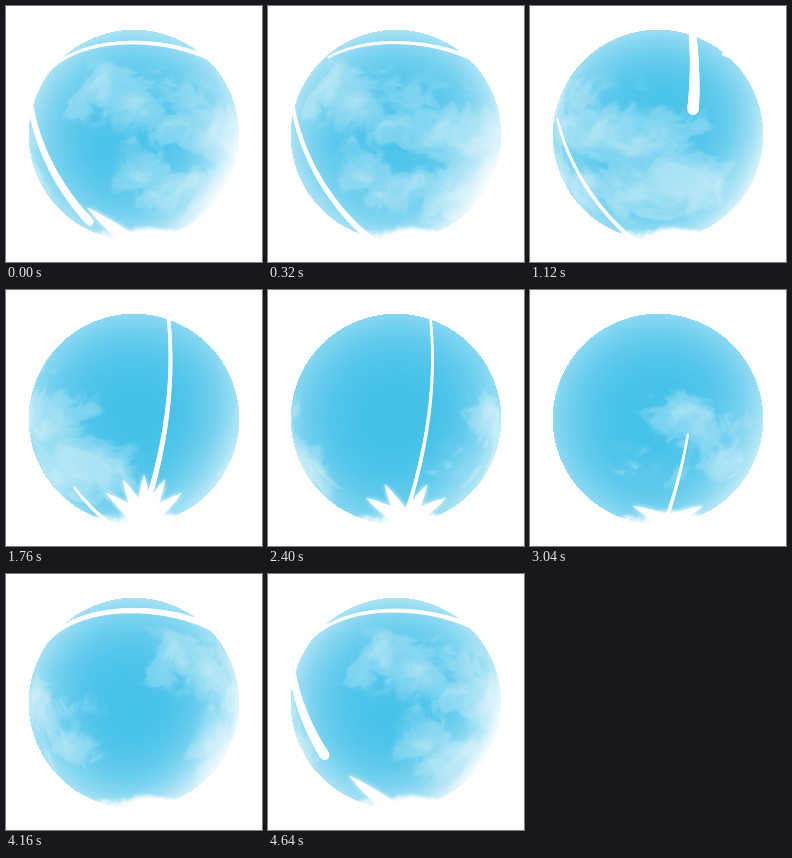
An HTML page with a canvas for the animation above (4.8 s loop, 256x256 px).

```html
<!DOCTYPE html>
<html lang="en">
<head>
<meta charset="utf-8">
<title>Cloud globe</title>
<style>
html, body { margin: 0; width: 100%; height: 100%; overflow: hidden; background: #fff; }
canvas { display: block; width: 256px; height: 256px; }
</style>
</head>
<body>
<canvas id="stage" width="256" height="256"></canvas>
<script>
const LOOP = 4800, STEP = 160, SIZE = 256;
const CX = 128, CY = 129, R = 105.3;
const COLS = 660, ROWS = 212, TAU = Math.PI * 2;
const BLUE = [60, 190, 232];
const ctx = document.getElementById('stage').getContext('2d');

const clamp = (x, a = 0, b = 1) => Math.min(b, Math.max(a, x));
const smooth = (a, b, x) => { x = clamp((x - a) / (b - a)); return x * x * (3 - 2 * x); };
const mix = (a, b, k) => a + (b - a) * k;
const since = (start, t) => (t - start + LOOP) % LOOP;

function hash(x, y, z) {
  let h = Math.imul(x, 374761393) ^ Math.imul(y, 668265263) ^ Math.imul(z, 1274126177);
  h = Math.imul(h ^ (h >>> 13), 1103515245);
  return ((h ^ (h >>> 16)) >>> 0) / 4294967296;
}

function noise(x, y, z) {
  const i = Math.floor(x), j = Math.floor(y), k = Math.floor(z);
  const u = smooth(0, 1, x - i), v = smooth(0, 1, y - j), w = smooth(0, 1, z - k);
  const edge = (b, c) => mix(hash(i, b, c), hash(i + 1, b, c), u);
  const face = c => mix(edge(j, c), edge(j + 1, c), v);
  return mix(face(k), face(k + 1), w);
}

function fbm(x, y, z, octaves) {
  let sum = 0, amp = 0.5, total = 0;
  for (let i = 0; i < octaves; i++) {
    sum += amp * noise(x, y, z);
    total += amp;
    amp *= 0.55;
    x = x * 2.03 + 7.1; y = y * 2.03 + 3.7; z = z * 2.03 + 5.3;
  }
  return sum / total;
}

// Cloud banks: longitude, height, size in degrees
const BANKS = [
  [-8, -0.34, 30], [12, 0.45, 20], [45, -0.1, 24], [72, 0.5, 28], [82, 0, 26],
  [112, 0.45, 21], [242, -0.05, 18], [262, 0.1, 21], [222, 0.5, 15], [272, 0.42, 15]
];

function density(lon, v) {
  let sum = 0;
  for (const [l, h, size] of BANKS) {
    const a = ((lon - l + 540) % 360 - 180) / size, b = (v - h) / size * 105;
    sum += 0.85 * Math.exp(-0.7 * (a * a + b * b));
  }
  return Math.min(sum, 1);
}

function makeClouds() {
  const map = new Float32Array(COLS * ROWS);
  for (let r = 0; r < ROWS; r++) {
    const v = clamp((r - ROWS / 2 + 0.5) / R, -1, 1), ring = Math.sqrt(1 - v * v);
    for (let c = 0; c < COLS; c++) {
      const a = c / COLS * TAU;
      const m = density(a / TAU * 360, v);
      if (m < 0.03) continue;
      const x = Math.cos(a) * ring * 3 + 20, y = v * 3.6 + 20, z = Math.sin(a) * ring * 3 + 20;
      const p = fbm(x + 9, y, z, 2) - 0.5, q = fbm(x, y + 9, z, 2) - 0.5;
      const n = fbm(x + p * 2, y + q * 2, z + p, 5);
      const k = m * 0.75 + (n - 0.5) * 1.5;
      map[r * COLS + c] = Math.min(1, m * 3) *
        (0.06 * m + 0.24 * smooth(0.18, 0.48, k) + 0.22 * smooth(0.45, 1, k));
    }
  }
  return map;
}

// Visible pixels with their longitude, limb haze and the glow at the foot
function makePixels() {
  const list = [];
  for (let y = 0; y < SIZE; y++) for (let x = 0; x < SIZE; x++) {
    const nx = (x + 0.5 - CX) / R, ny = (y + 0.5 - CY) / R, r = Math.hypot(nx, ny);
    if (r >= 1) continue;
    const lon = Math.asin(clamp(nx / Math.sqrt(1 - ny * ny), -1, 1)) / TAU * COLS;
    const side = Math.max(0, nx * 0.85 + ny * 0.5);
    const haze = 0.04 + 0.34 * r ** 3 + 0.28 * side ** 3;
    const wisp = fbm(x / 12, y / 12, 4, 3) - 0.5;
    const gx = (x - 138) / 46, gy = (y - 232) / 11;
    const glow = smooth(0.2, 0.8, Math.exp(-gx * gx - gy * gy) + wisp * 0.7);
    const row = clamp(Math.floor(ny * R + ROWS / 2), 0, ROWS - 1);
    list.push({ at: (y * SIZE + x) * 4, row: row * COLS, lon, haze, glow });
  }
  return list;
}

const clouds = makeClouds(), pixels = makePixels();
const image = ctx.createImageData(SIZE, SIZE);

function drawGlobe(t) {
  const turn = t / LOOP, data = image.data;
  const swell = 1.25 + 0.25 * Math.cos(turn * TAU);
  data.fill(255);
  for (const p of pixels) {
    const col = Math.floor(p.lon + turn * COLS + COLS) % COLS;
    const clear = (1 - Math.min(1, p.haze * swell)) * (1 - clouds[p.row + col]) * (1 - p.glow);
    for (let i = 0; i < 3; i++) data[p.at + i] = 255 - (255 - BLUE[i]) * clear;
  }
  ctx.putImageData(image, 0, 0);
}

function bezier([a, b, c, d], s) {
  const q = 1 - s;
  return [0, 1].map(k => q * q * q * a[k] + 3 * q * q * s * b[k] + 3 * q * s * s * c[k] + s * s * s * d[k]);
}

// All trails share one life: fly in, thin out, then withdraw from the tail
const FLY = 640, HOLD = 1500, FADE = 1150;
const TRAILS = [
  { start: 880, path: [[162, 24], [170, 95], [158, 165], [136, 230]] },
  { start: 3420, path: [[38, 70], [72, 26], [165, 29], [214, 58]] },
  { start: 4280, path: [[24, 94], [30, 145], [62, 203], [108, 237]] }
];

function drawTrail({ start, path }, t) {
  const age = since(start, t);
  const head = clamp(age / FLY), tail = clamp((age - HOLD) / FADE);
  if (tail >= head) return;
  const width = 3.5 + 13 * Math.exp(-age / 500);
  const parts = 60;
  let last = bezier(path, tail);
  for (let i = 1; i <= parts; i++) {
    const k = i / parts, next = bezier(path, mix(tail, head, k));
    ctx.lineWidth = width * (0.6 + 0.4 * k);
    ctx.beginPath();
    ctx.moveTo(...last);
    ctx.lineTo(...next);
    ctx.stroke();
    last = next;
  }
}

// A pointed tongue of cloud rising from the foot, angle in degrees from upright
function drawTongue(x, angle, length, width) {
  ctx.save();
  ctx.translate(x, 232);
  ctx.rotate(angle * TAU / 360);
  ctx.beginPath();
  ctx.moveTo(-width / 2, 4);
  ctx.quadraticCurveTo(-width / 3, -length * 0.6, 0, -length);
  ctx.quadraticCurveTo(width / 3, -length * 0.6, width / 2, 4);
  ctx.fill();
  ctx.restore();
}

// The fan opens after the vertical trail lands; outer tongues last longest
function drawSplash(t) {
  const age = since(TRAILS[0].start + FLY, t);
  for (let i = -2; i <= 2; i++) {
    const life = 900 + 700 * Math.abs(i);
    if (age >= life) continue;
    const size = smooth(0, 200, age) * (1 - (age / life) ** 4);
    drawTongue(138, i * (25 + age / 200), 48 * size, 18 * size);
  }
}

function drawLick(peak, x, angle, width, t) {
  const off = since(peak - LOOP / 2, t) - LOOP / 2;
  const size = 1 - smooth(0, 480, Math.abs(off));
  if (size > 0) drawTongue(x, angle, 54 * size, width * size);
}

function draw(t) {
  drawGlobe(t);
  ctx.save();
  ctx.beginPath();
  ctx.arc(CX, CY, R + 1, 0, TAU);
  ctx.clip();
  ctx.strokeStyle = ctx.fillStyle = ctx.shadowColor = '#fff';
  ctx.lineCap = 'round';
  TRAILS.forEach(trail => drawTrail(trail, t));
  ctx.shadowBlur = 5;
  drawSplash(t);
  drawLick(3680, 128, 31, 24, t);
  drawLick(4720, 120, -52, 16, t);
  ctx.restore();
}

const begin = performance.now();
let shown = -1;
function tick() {
  const step = Math.floor(((performance.now() - begin) % LOOP) / STEP);
  if (step !== shown) draw((shown = step) * STEP);
  requestAnimationFrame(tick);
}
tick();
</script>
</body>
</html>
```
